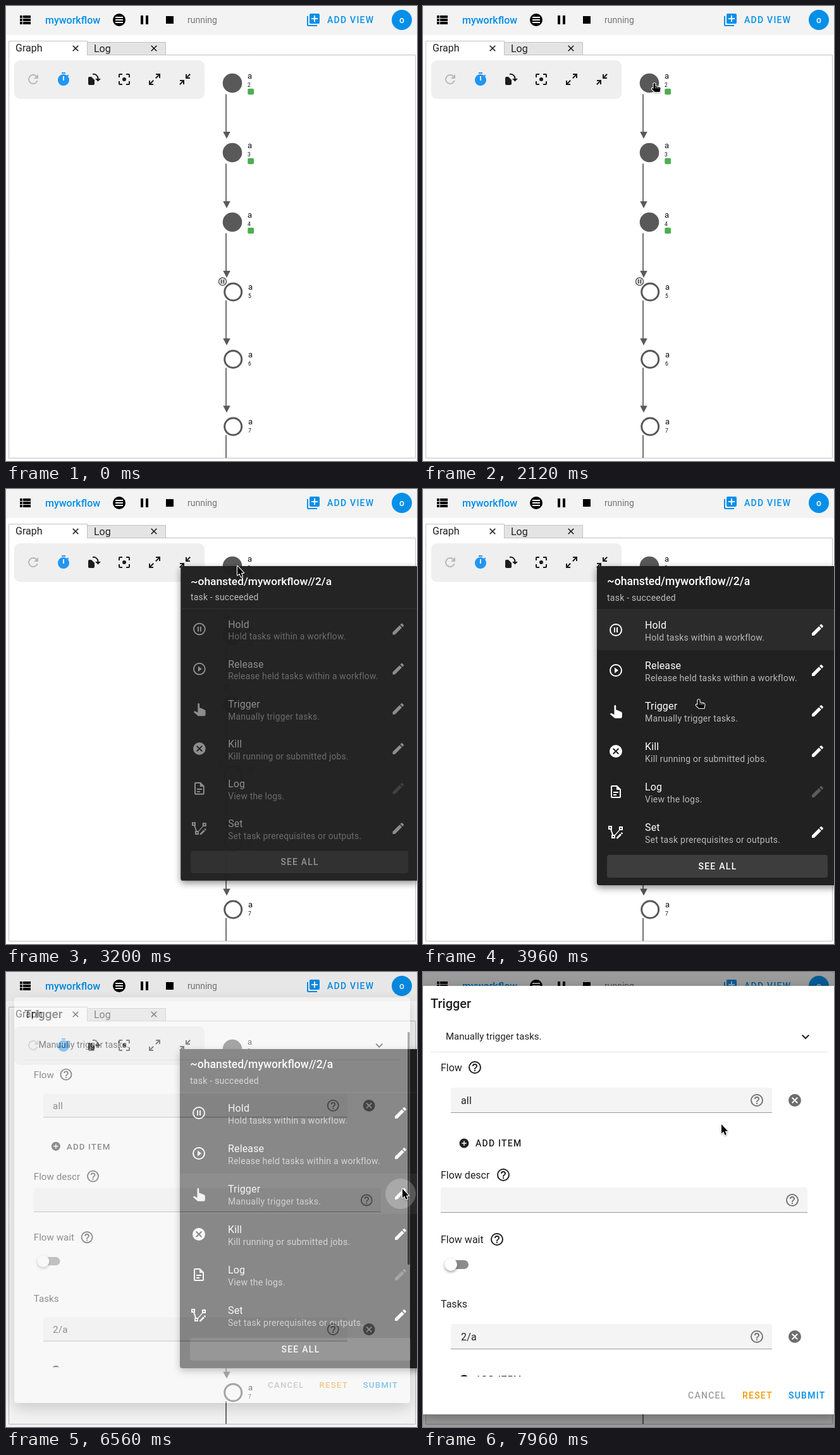
Animation of 650x720 px, one loop 8000 ms. Source, as an HTML page with a canvas:

```html
<!DOCTYPE html>
<html lang="en">
<head>
<meta charset="utf-8">
<title>Workflow graph</title>
<style>
html, body { margin: 0; width: 100%; height: 100%; overflow: hidden; background: #fff; }
canvas { display: block; }
</style>
</head>
<body>
<canvas id="stage" width="650" height="720"></canvas>
<script>
const W = 650, H = 720, LOOP = 8000, STEP = 40;
const stage = document.getElementById('stage').getContext('2d');
const layerCanvas = document.createElement('canvas');
layerCanvas.width = W;
layerCanvas.height = H;
const layerCtx = layerCanvas.getContext('2d');
let c = stage;

const BLUE = '#048fe9', INK = '#212121', NODE = '#595959';
const MENU_AT = 3011, DIALOG_AT = 6519, CLICK_AT = 5960;

// 24 x 24 icons
const RING = 'M12 2A10 10 0 0 0 12 22A10 10 0 0 0 12 2M12 4A8 8 0 0 1 12 20A8 8 0 0 1 12 4';
const ICONS = {
  list: 'M9 5V9H21V5M9 19H21V15H9M9 14H21V10H9M4 9H8V5H4M4 19H8V15H4M4 14H8V10H4Z',
  menu: 'M12 2A10 10 0 0 0 12 22A10 10 0 0 0 12 2M6 7V9H18V7M6 11V13H18V11M6 15V17H18V15Z',
  pause: 'M14 19H18V5H14M6 19H10V5H6Z',
  stop: 'M18 18H6V6H18Z',
  addView: 'M19 11H15V15H13V11H9V9H13V5H15V9H19M20 2H8A2 2 0 0 0 6 4V16A2 2 0 0 0 8 18H20A2 2 0 0 0 22 16V4A2 2 0 0 0 20 2M4 6H2V20A2 2 0 0 0 4 22H18V20H4Z',
  refresh: 'M17.65 6.35A8 8 0 1 0 19.73 14H17.65A6 6 0 1 1 16.22 7.78L13 11H20V4Z',
  timer: 'M19 7.4L20.45 6L19 4.56L17.6 6A9 9 0 1 0 19 7.4M13 14H11V7H13ZM15 1H9V3H15Z',
  rotate: 'M3 10A2 2 0 0 1 5 8H8L13 13V19A2 2 0 0 1 11 21H5A2 2 0 0 1 3 19ZM10 3A8 8 0 0 1 19.5 11H23L18.5 15.5L14 11H17.5A6 6 0 0 0 10 5Z',
  focus: 'M12 9A3 3 0 0 0 12 15A3 3 0 0 0 12 9M19 19H15V21H19A2 2 0 0 0 21 19V15H19M19 3H15V5H19V9H21V5A2 2 0 0 0 19 3M5 5H9V3H5A2 2 0 0 0 3 5V9H5M5 15H3V19A2 2 0 0 0 5 21H9V19H5Z',
  expand: 'M10 21V19H6.4L10.9 14.5L9.5 13.1L5 17.6V14H3V21M14.5 10.9L19 6.4V10H21V3H14V5H17.6L13.1 9.5Z',
  collapse: 'M19.5 3.1L15 7.6V4H13V11H20V9H16.4L20.9 4.5M4 13V15H7.6L3.1 19.5L4.5 20.9L9 16.4V20H11V13Z',
  hold: RING + 'M13 16V8H15V16ZM9 16V8H11V16Z',
  release: RING + 'M10 16.5L16 12L10 7.5Z',
  trigger: 'M10 9A1 1 0 0 1 12 9V13.5L13.2 13.6L18.2 15.8Q19 16.3 19 17.1V21.5Q18.9 22.9 17.5 23H11Q10.4 23 10 22.6L5.1 18.4L5.8 17.6Q6.2 17.2 6.8 17.3L10 19Z',
  closeCircle: 'M12 2A10 10 0 0 0 12 22A10 10 0 0 0 12 2M15.6 7L12 10.6L8.4 7L7 8.4L10.6 12L7 15.6L8.4 17L12 13.4L15.6 17L17 15.6L13.4 12L17 8.4Z',
  log: 'M6 2A2 2 0 0 0 4 4V20A2 2 0 0 0 6 22H18A2 2 0 0 0 20 20V8L14 2M6 4H13V9H18V20H6ZM8 12V14H16V12ZM8 16V18H13V16Z',
  set: 'M0 2H6V8H5.2L8 16H10.5L17 8.6V3H23V9H18.3L11 17.4V22H5V16H6L3.2 8H0ZM2 4V6H4V4ZM19 5V7H21V5ZM7 18V20H9V18ZM13 20.2L19 14.2L21 16.2L15 22.2H13ZM19.7 13.5L20.8 12.4Q21.3 12 21.8 12.4L22.8 13.4Q23.2 13.9 22.8 14.4L21.7 15.5Z',
  pencil: 'M20.7 7Q21.3 6.3 20.7 5.6L18.4 3.3Q17.7 2.7 17 3.3L15.1 5.1L18.9 8.9M3 17.25V21H6.75L17.8 9.9L14.1 6.2Z',
  help: RING + 'M11 18H13V16H11ZM12 6A4 4 0 0 0 8 10H10A2 2 0 0 1 14 10C14 12 11 11.75 11 15H13C13 12.75 16 12.5 16 10A4 4 0 0 0 12 6Z',
  plusCircle: 'M17 13H13V17H11V13H7V11H11V7H13V11H17M12 2A10 10 0 0 0 12 22A10 10 0 0 0 12 2Z'
};
for (const k in ICONS) ICONS[k] = new Path2D(ICONS[k]);
const ARROW = new Path2D('M0 0V14.5L3.2 11.6L5.6 17L8 16L5.7 10.8H10Z');
const HAND = new Path2D('M-1.5 1.2Q0 -1 1.5 1.2V5L8 6.2Q9.5 6.7 9.5 8.5L8.5 14H.5L-4 9.5Q-4.5 7.5 -2.5 8L-1.5 9Z');

const MENU = [
  ['hold', 'Hold', 'Hold tasks within a workflow.'],
  ['release', 'Release', 'Release held tasks within a workflow.'],
  ['trigger', 'Trigger', 'Manually trigger tasks.'],
  ['closeCircle', 'Kill', 'Kill running or submitted jobs.'],
  ['log', 'Log', 'View the logs.'],
  ['set', 'Set', 'Set task prerequisites or outputs.']
];

// time, x, y of the pointer
const PATH = [
  [920, -4, 314], [1960, 366, 122], [3680, 366, 122], [3960, 436, 333],
  [4520, 598, 365], [4800, 621, 358], [5280, 621, 358], [5520, 627, 343],
  [7240, 627, 343], [7960, 472, 241]
];

const clamp = v => Math.max(0, Math.min(1, v));
const ramp = (t, from, span) => clamp((t - from) / span);
const smooth = p => (1 - Math.cos(Math.PI * p)) / 2;

function bezier(x1, y1, x2, y2) {
  const at = (a, b, u) => 3 * (1 - u) * (1 - u) * u * a + 3 * (1 - u) * u * u * b + u * u * u;
  return x => {
    let lo = 0, hi = 1;
    for (let i = 0; i < 24; i++) {
      const mid = (lo + hi) / 2;
      if (at(x1, x2, mid) < x) lo = mid; else hi = mid;
    }
    return x >= 1 ? 1 : at(y1, y2, lo);
  };
}
const decelerate = bezier(0, 0, .2, 1);
const standard = bezier(.4, 0, .2, 1);

function text(s, x, y, size, color = INK, weight = 400, spacing = 0, align = 'left') {
  c.font = `${weight} ${size}px Roboto, sans-serif`;
  c.letterSpacing = spacing + 'px';
  c.textAlign = align;
  c.fillStyle = color;
  c.fillText(s, x, y);
}

function rect(x, y, w, h, color, r = 0) {
  c.fillStyle = color;
  c.beginPath();
  c.roundRect(x, y, w, h, r);
  c.fill();
}

function disc(x, y, r, color) {
  c.fillStyle = color;
  c.beginPath();
  c.arc(x, y, r, 0, 7);
  c.fill();
}

function ring(x, y, r, width, color) {
  c.strokeStyle = color;
  c.lineWidth = width;
  c.beginPath();
  c.arc(x, y, r, 0, 7);
  c.stroke();
}

function line(color, width, ...pts) {
  c.strokeStyle = color;
  c.lineWidth = width;
  c.beginPath();
  for (let i = 0; i < pts.length; i += 2) c.lineTo(pts[i], pts[i + 1]);
  c.stroke();
}

function icon(name, x, y, color = '#000', size = 24) {
  c.save();
  c.translate(x - size / 2, y - size / 2);
  c.scale(size / 24, size / 24);
  c.fillStyle = color;
  c.fill(ICONS[name], 'evenodd');
  c.restore();
}

function shadow(blur, dy, alpha) {
  c.shadowColor = `rgba(0,0,0,${alpha})`;
  c.shadowBlur = blur;
  c.shadowOffsetY = dy;
}

// Draws a scaled group and lays it over the stage as one translucent sheet.
function layer(alpha, scale, ox, oy, draw) {
  c = layerCtx;
  c.clearRect(0, 0, W, H);
  c.save();
  c.translate(ox, oy);
  c.scale(scale, scale);
  c.translate(-ox, -oy);
  draw();
  c.restore();
  c = stage;
  c.globalAlpha = alpha;
  c.drawImage(layerCanvas, 0, 0);
  c.globalAlpha = 1;
}

function header() {
  rect(0, 0, W, 46, '#f3f3f3');
  icon('list', 30, 22);
  text('myworkflow', 62, 28, 16, BLUE, 500);
  icon('menu', 179, 22);
  icon('pause', 219, 22);
  icon('stop', 259, 22);
  text('running', 287, 27, 14, '#757575');
  icon('addView', 486, 22, BLUE);
  text('ADD VIEW', 508, 27, 14, BLUE, 500, 1.25);
  disc(626, 22, 16, BLUE);
  text('o', 626, 26.5, 14, '#fff', 500, 0, 'center');
}

function cross(x, y) {
  line('#111', 1.5, x - 4.3, y - 4.3, x + 4.3, y + 4.3);
  line('#111', 1.5, x + 4.3, y - 4.3, x - 4.3, y + 4.3);
}

function tabs() {
  const edge = '#c0c0c0';
  rect(128, 57, 125, 21, '#e4e4e4');
  line(edge, 1, 128.5, 77, 128.5, 57.5, 252.5, 57.5, 252.5, 77);
  line(edge, 1, 128, 77.5, 647.5, 77.5, 647.5, 715.5, 4.5, 715.5, 4.5, 55.5, 128.5, 55.5, 128.5, 77.5);
  text('Graph', 15, 72, 16);
  text('Log', 139, 73, 16);
  cross(110, 67);
  cross(234, 67);
}

function toolbar() {
  rect(13, 86, 301, 61, '#efefef', 9);
  ['refresh', 'timer', 'rotate', 'focus', 'expand', 'collapse'].forEach((name, i) =>
    icon(name, 43 + 48 * i, 116, ['#b9b9b9', '#2196f3'][i] || '#1c1c1c'));
}

function edge(y1, y2) {
  line(NODE, 1.7, 348, y1, 348, y2 - 9);
  c.fillStyle = NODE;
  c.beginPath();
  c.moveTo(343.3, y2 - 11);
  c.lineTo(354.7, y2 - 11);
  c.lineTo(349, y2);
  c.fill();
}

function graph() {
  c.save();
  c.beginPath();
  c.rect(5, 78, 642, 637);
  c.clip();
  for (let i = 0; i < 3; i++) {
    const done = 122 + 110 * i, todo = 452.5 + 106.5 * i;
    edge(done + 17.5, done + 88);
    disc(358, done, 15.3, NODE);
    text('a', 382, done - 7, 13, '#111');
    text(String(i + 2), 382, done + 6, 8.5, '#111');
    rect(382.3, done + 8.8, 9.7, 9.4, '#4caf50', 1.8);
    edge(todo + 13.5, todo + 84.5);
    ring(359.2, todo, 13.5, 3, NODE);
    text('a', 383, todo - 3.5, 13, '#111');
    text(String(i + 5), 383, todo + 9.5, 8.5, '#111');
  }
  ring(342.5, 436, 6, 1.6, NODE);
  rect(339.6, 432.6, 2.2, 6.8, NODE);
  rect(343.2, 432.6, 2.2, 6.8, NODE);
  c.restore();
}

function menu(t) {
  const p = decelerate(ramp(t, MENU_AT, 225));
  if (p <= 0) return;
  const items = clamp((standard(ramp(t, MENU_AT, 450)) - .33) / .67);
  layer(p, p, 365, 122, () => {
    c.save();
    shadow(12, 4, .45);
    rect(275, 122, 381, 505, INK, 4);
    c.restore();
    text('~ohansted/myworkflow//2/a', 291, 152, 17.6, '#fff', 500);
    text('task - succeeded', 291, 177, 14, '#bcbcbc', 400, .25);
    rect(275, 190, 381, 1, '#303030');

    const onHold = ramp(t, 3760, 120) * (1 - ramp(t, 3980, 160));
    const onTrigger = ramp(t, 3980, 160);
    rect(275, 191, 381, 64, `rgba(255,255,255,${.045 * onHold})`);
    rect(275, 319, 381, 64, `rgba(255,255,255,${.045 * onTrigger})`);
    disc(624, 351, 24, `rgba(255,255,255,${.05 * ramp(t, 4560, 200)})`);
    const ripple = ramp(t, CLICK_AT, 400);
    if (ripple > 0) disc(624, 351, 6 + 18 * decelerate(ripple), `rgba(255,255,255,${.22 * ramp(t, CLICK_AT - 40, 200)})`);

    c.globalAlpha = items;
    MENU.forEach(([name, title, hint], i) => {
      const y = 223 + 64 * i;
      if (name === 'trigger') icon(name, 305.2, y - 3.5, '#fff', 33);
      else icon(name, 305, y, '#fff');
      text(title, 351, y - 2, 16, '#fff', 400, .15);
      text(hint, 351, y + 17, 14, '#b8b8b8', 400, .25);
      icon('pencil', 624, y, name === 'log' ? '#5c5c5c' : '#fff');
    });
    rect(291, 579, 349, 36, '#3d3d3d', 4);
    text('SEE ALL', 466, 602, 14, '#fff', 500, 1.25, 'center');
    c.globalAlpha = 1;
  });
}

function field(x, y, w, value) {
  rect(x, y, w, 40, '#f4f4f4', [4, 4, 0, 0]);
  rect(x, y + 39, w, 1, '#999');
  text(value, x + 16, y + 26, 16, INK, 400, .15);
  icon('help', x + w - 24, y + 20, '#757575');
}

function listField(y, value) {
  field(44, y, 508, value);
  icon('closeCircle', 588, y + 20, '#6e6e6e');
  icon('plusCircle', 65, y + 88, INK, 18);
  text('ADD ITEM', 83, y + 93, 14, INK, 500, 1.25);
}

function form() {
  c.save();
  shadow(22, 8, .35);
  rect(-4.5, 22, 661, 678, '#fff', 4);
  c.restore();
  text('Trigger', 12, 57, 20, INK, 500);

  c.save();
  c.beginPath();
  c.rect(-4.5, 76, 661, 564);
  c.clip();
  text('Manually trigger tasks.', 36, 107, 15);
  line(INK, 2, 599.7, 99.7, 605, 105, 610.3, 99.7);
  rect(12, 126, 628, 1, '#e4e4e4');
  text('Flow', 28, 157, 16);
  icon('help', 82, 151, INK);
  listField(183, 'all');
  text('Flow descr', 28, 327, 16);
  icon('help', 127, 321, INK);
  field(28, 341, 580, '');
  text('Flow wait', 28, 429, 16);
  icon('help', 117, 423, INK);
  rect(38, 456, 34, 14, '#8c8c8c', 7);
  c.save();
  shadow(4, 2, .4);
  disc(44, 463, 10, '#fff');
  c.restore();
  text('Tasks', 28, 531, 16);
  listField(557, '2/a');
  rect(652.5, 80, 3.5, 389, '#555', 1.5);
  c.restore();

  text('CANCEL', 419, 675, 14, '#9e9e9e', 500, 1.25);
  text('RESET', 505, 675, 14, '#f09a10', 500, 1.25);
  text('SUBMIT', 578, 675, 14, BLUE, 500, 1.25);
}

function dialog(t) {
  const p = decelerate(ramp(t, DIALOG_AT, 225));
  if (p <= 0) return;
  rect(0, 0, W, H, `rgba(0,0,0,${.36 * standard(ramp(t, DIALOG_AT, 200))})`);
  layer(p, .9 + .1 * p, 326, 361, form);
}

function pointer(t) {
  if (t < 960) return;
  let i = 0;
  while (i < PATH.length - 2 && t >= PATH[i + 1][0]) i++;
  const [t0, x0, y0] = PATH[i], [t1, x1, y1] = PATH[i + 1];
  const p = smooth(ramp(t, t0, t1 - t0));
  const x = x0 + (x1 - x0) * p, y = y0 + (y1 - y0) * p;
  const onNode = t < MENU_AT && Math.hypot(x - 358, y - 122) < 16;
  const onItem = t > 3680 && t < DIALOG_AT && y > 191;
  const shape = onNode || onItem ? HAND : ARROW;
  c.save();
  c.translate(x, y);
  c.lineJoin = 'round';
  c.strokeStyle = '#fff';
  c.lineWidth = 2.2;
  shadow(2, 1, .35);
  c.stroke(shape);
  c.shadowColor = 'transparent';
  c.fillStyle = '#000';
  c.fill(shape);
  if (shape === HAND) for (const k of [2, 4.6, 7]) line('#fff', .8, k, 6, k, 8.5);
  c.restore();
}

function draw(t) {
  rect(0, 0, W, H, '#fff');
  header();
  tabs();
  toolbar();
  graph();
  menu(t);
  dialog(t);
  pointer(t);
}

const start = performance.now();
function tick() {
  const t = (performance.now() - start) % LOOP;
  draw(Math.floor(t / STEP) * STEP);
  requestAnimationFrame(tick);
}
tick();
</script>
</body>
</html>
```
